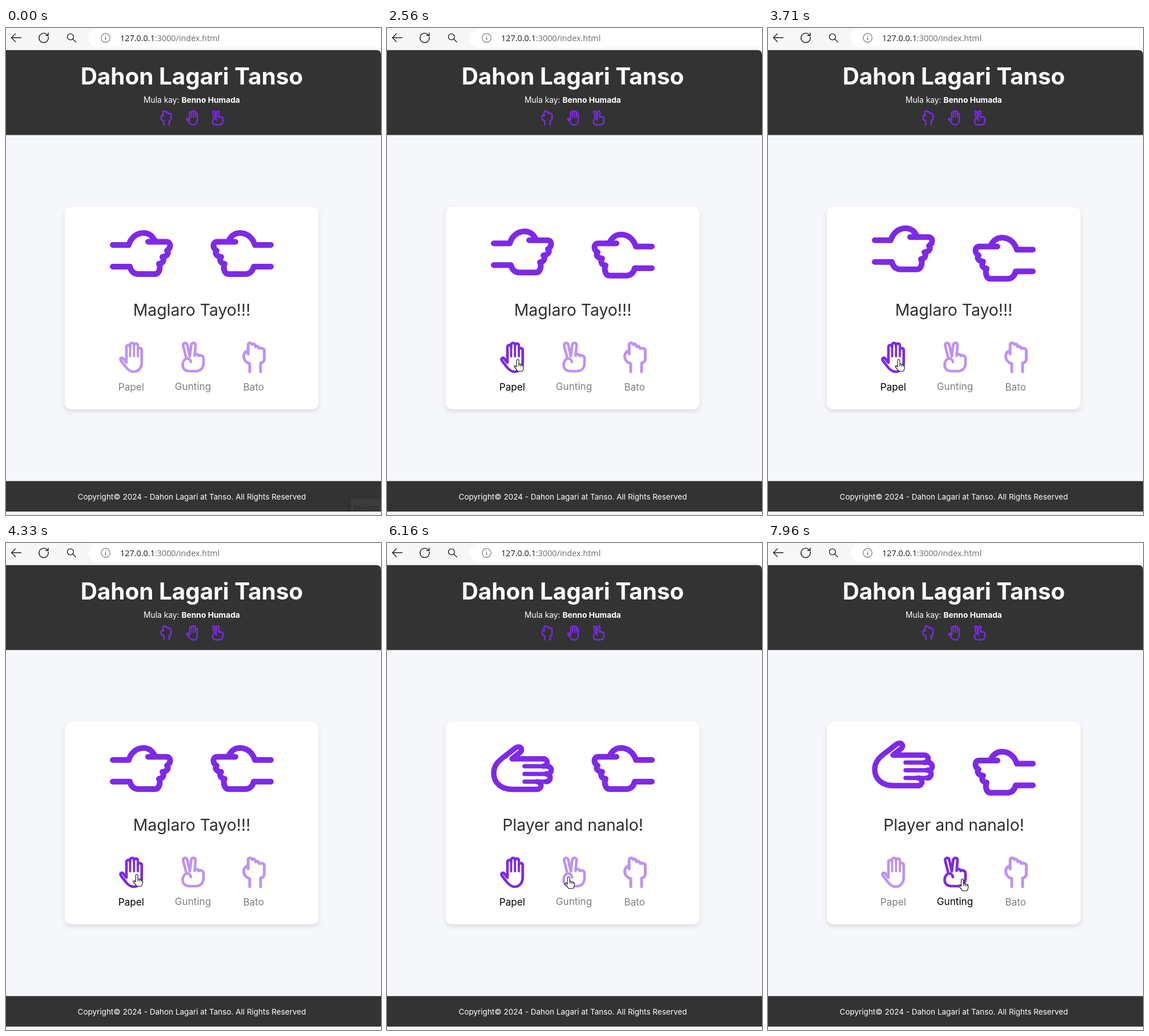
These frames come from a looping animation (657 px wide and 853 px high, 8 s). An HTML page:

```html
<!DOCTYPE html>
<html lang="tl">
<head>
<meta charset="utf-8">
<title>Dahon Lagari Tanso</title>
<style>
  html, body { margin: 0; width: 100%; height: 100%; overflow: hidden; background: #f7f7f7; }
  svg { display: block; width: 100vw; height: 100vh; }
  text { font-family: Inter, sans-serif; }
  .mid { text-anchor: middle; }
  .url { font-family: "Open Sans", sans-serif; font-size: 14.4px; }
  .label { font-size: 17.1px; text-anchor: middle; }
  .hand { fill: none; stroke: #7d2ae8; stroke-width: 10; stroke-linecap: round; stroke-linejoin: round; }
  .bar { fill: none; stroke: #222; stroke-width: 1.4; stroke-linecap: round; stroke-linejoin: round; }
</style>
</head>
<body>
<svg viewBox="0 0 657 853" xmlns="http://www.w3.org/2000/svg">
  <defs>
    <filter id="soft" x="-10%" y="-10%" width="120%" height="120%">
      <feDropShadow dx="0" dy="4" stdDeviation="4.5" flood-color="#000" flood-opacity=".11"/>
    </filter>
    <!-- fist and palm lie on their side, 111 x 84; scissors stand upright, 84 x 111 -->
    <path id="fist" class="hand" stroke-width="10.4" d="M5 27H33C37 14 47 6 59 6C68 6 74 11 78 18M67 21.5H99C107 21.5 108 32 100 37C104 42 100 47 92 48C96 54 93 59 86 60C89 66 87 78 79 78H50C42 78 37 73 35 65H5"/>
    <g id="palm" class="hand">
      <path style="stroke-width:9.4" d="M92 38a6.5 6.5 0 0 0 0-13H37L52 13C57 7 50 1 43 6L25 20C11 30 5 38 5 50C5 67 18 78.5 38 78.5H81a6.7 6.7 0 0 0 0-13.4M99 38a6.75 6.75 0 0 1 0 13.5M97 51.5a6.75 6.75 0 0 1 0 13.5"/>
      <path style="stroke-width:7.6" d="M59 38H99M59 51.5H99M59 65H97"/>
    </g>
    <path id="scissors" class="hand" style="stroke-width:9.4" d="M18 59L7 16C5 4 18 2 21 11L30 52L35 12C37 2 52 3 50 14L47 50C48 42 60 43 61 51C64 46 78 49 78 59V74C78 93 68 104 52 104H28C12 104 5 94 5 82C5 72 10 64 18 59C26 59 33 64 34 72"/>
    <clipPath id="footClip"><rect x="604" y="825" width="53" height="22"/></clipPath>
  </defs>

  <!-- browser bar -->
  <rect width="657" height="853" fill="#f7f7f7"/>
  <rect x="145" y="1" width="540" height="33" rx="16.5" fill="#fff"/>
  <path class="bar" d="M9.5 17H26.5M16.5 10L9.5 17L16.5 24"/>
  <path class="bar" d="M74 15.5A8.2 8.2 0 1 1 70.5 10.5L73.5 13M74 8.8V13.2H69.5"/>
  <path class="bar" d="M118.3 15.5a5.4 5.4 0 1 1-10.8 0a5.4 5.4 0 1 1 10.8 0M117 19.4L122.3 24.5"/>
  <circle cx="174.5" cy="17.3" r="7.8" fill="none" stroke="#666" stroke-width="1.1"/>
  <path d="M174.5 16.2V21.2M174.5 13V14.3" stroke="#555" stroke-width="1.3"/>
  <text class="url" x="200" y="23" fill="#1b1b1b">127.0.0.1<tspan fill="#6c6c6c">:3000/index.html</tspan></text>

  <!-- page -->
  <rect y="180" width="657" height="620" fill="#f6f7fb"/>
  <path d="M0 38.7H649Q657 38.7 657 46.7V187.4H0Z" fill="#333"/>
  <text class="mid" x="325.5" y="99" font-size="40.4" font-weight="700" fill="#fff">Dahon Lagari Tanso</text>
  <text class="mid" x="325.5" y="130.5" font-size="13.8" fill="#fff">Mula kay: <tspan font-weight="700">Benno Humada</tspan></text>
  <use href="#fist" transform="translate(270 171) scale(.245) rotate(-90)"/>
  <use href="#palm" transform="translate(315.5 171) scale(.25 .245) rotate(-90)"/>
  <use href="#scissors" transform="translate(360.5 144) scale(.25 .245)"/>

  <rect x="103" y="313.5" width="444.5" height="354" rx="11" fill="#fff" filter="url(#soft)"/>
  <g id="left"><use id="fistL" href="#fist"/><use id="palmL" href="#palm"/></g>
  <g id="right"><use href="#fist"/></g>
  <text id="msg" class="mid" x="325.5" y="504" font-size="28.4" fill="#2f2f2f"></text>

  <g id="papel">
    <use href="#palm" transform="translate(198.5 604.5) scale(.5) rotate(-90)"/>
    <text class="label" x="219.3" y="635">Papel</text>
  </g>
  <g id="gunting">
    <use href="#scissors" transform="translate(307 549) scale(.5)"/>
    <text class="label" x="327.5" y="634.3">Gunting</text>
  </g>
  <g opacity=".5">
    <use href="#fist" transform="translate(413.5 604.5) scale(.5) rotate(-90)"/>
    <text class="label" x="433.7" y="635">Bato</text>
  </g>

  <rect y="793.6" width="657" height="53.4" fill="#333"/>
  <text class="mid" x="325.5" y="826" font-size="13.5" fill="#fff">Copyright© 2024 - Dahon Lagari at Tanso. All Rights Reserved</text>
  <g id="tip" clip-path="url(#footClip)">
    <rect x="604" y="825" width="53" height="22" fill="#3c3c3c"/>
    <text x="609" y="846" font-size="13" fill="#2b2b2b">Record</text>
  </g>

  <g id="cursor" stroke="#111" stroke-width="1.1" stroke-linejoin="round" fill="#fff">
    <path id="arrow" d="M0 0V15.5L3.6 12.2L6 17.8L8.4 16.8L6 11.3H11Z"/>
    <path id="pointer" d="M-2 2Q-2 0 0 0Q2 0 2 2V8Q4 6.8 5 9Q7 7.8 8 10Q10 9.2 10.3 11.5V15Q10 18 8 20.8H0Q-2 17 -6 13Q-6 10.8 -4.3 11L-2 13ZM2 8V12M5 9V12.5M8 10V13"/>
  </g>
</svg>
<script>
const LOOP = 8000, AMP = 8.5, HALF = 700;
const ROUND_1 = 1585, RESULT = 5020, ROUND_2 = 7638;
const $ = id => document.getElementById(id);
const clamp = v => Math.max(0, Math.min(1, v));
const show = (id, on) => $(id).setAttribute('visibility', on ? 'visible' : 'hidden');

// CSS "ease": cubic-bezier(.25, .1, .25, 1)
function ease(x) {
  if (x <= 0 || x >= 1) return clamp(x);
  const bez = (a, b, s) => 3 * a * s * (1 - s) ** 2 + 3 * b * s * s * (1 - s) + s ** 3;
  let lo = 0, hi = 1;
  for (let i = 0; i < 22; i++) {
    const m = (lo + hi) / 2;
    if (bez(.25, .25, m) < x) lo = m; else hi = m;
  }
  return bez(.1, 1, lo);
}

function shake(t) {
  const start = t >= ROUND_2 ? ROUND_2 : t >= ROUND_1 && t < RESULT ? ROUND_1 : null;
  if (start === null) return 0;
  const p = ((t - start) / HALF) % 2;
  return AMP * (p < 1 ? ease(p) : 1 - ease(p - 1));
}

// time, x, y of the cursor's hot spot
const track = [
  [200, 579, 852], [330, 520, 690], [480, 425, 500], [570, 350, 462], [690, 238, 545],
  [830, 227, 578], [1100, 230, 578], [1250, 229, 580.5], [5870, 229, 580.5],
  [5990, 258, 577], [6160, 318, 584.5], [6350, 333, 586], [6670, 340, 588], [6770, 340.5, 588.5]
];

function cursorAt(t) {
  const last = track[track.length - 1];
  if (t >= last[0]) return last.slice(1);
  const i = Math.max(1, track.findIndex(k => k[0] > t));
  const [a, b] = [track[i - 1], track[i]];
  const p = clamp((t - a[0]) / (b[0] - a[0]));
  return [a[1] + (b[1] - a[1]) * p, a[2] + (b[2] - a[2]) * p];
}

function draw(t) {
  const d = shake(t), won = t >= RESULT;
  $('left').setAttribute('transform', `translate(182 ${353 - d})`);
  $('right').setAttribute('transform', `translate(469 ${353 + d}) scale(-1 1)`);
  show('fistL', !won);
  show('palmL', won);
  $('msg').textContent = won ? 'Player and nanalo!' : 'Maglaro Tayo!!!';

  const fade = (from, len) => .5 + .5 * ease((t - from) / len);
  $('papel').setAttribute('opacity', t < ROUND_2 ? fade(690, 300) : 1.5 - fade(ROUND_2, 200));
  $('gunting').setAttribute('opacity', fade(6170, 300));
  $('tip').setAttribute('opacity', 1 - clamp((t - 200) / 200));

  const [x, y] = cursorAt(t);
  const onOption = y > 545 && y < 640 && ((x > 190 && x < 249) || (x > 290 && x < 362));
  $('cursor').setAttribute('transform', `translate(${x} ${y})`);
  show('pointer', t >= 200 && onOption);
  show('arrow', t >= 200 && !onOption);
}

const begin = performance.now();
function tick() {
  draw((performance.now() - begin) % LOOP);
  requestAnimationFrame(tick);
}
tick();
</script>
</body>
</html>
```
